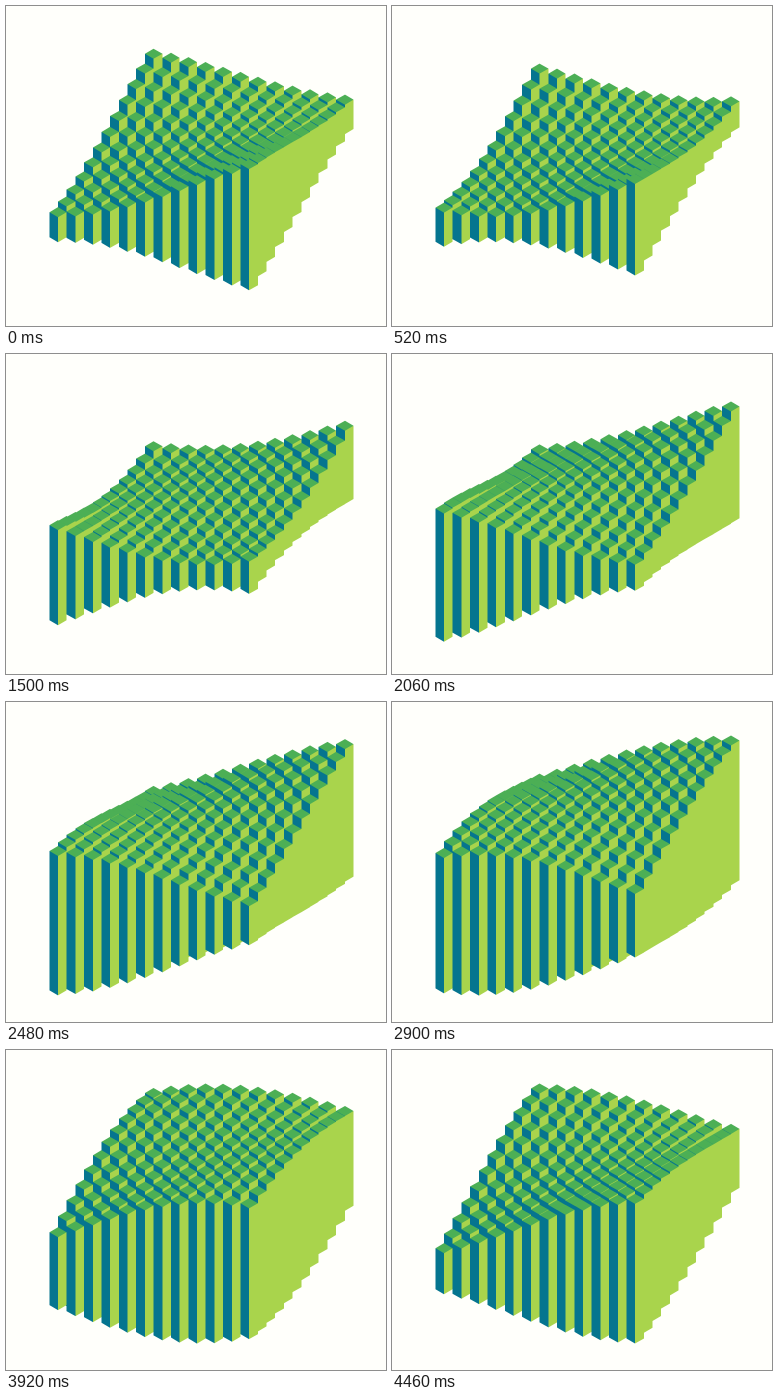
An HTML page with a canvas for the animation above (4.48 s loop, 380x320 px).

```html
<!DOCTYPE html>
<html>
<head>
<meta charset="utf-8">
<title>Column wave</title>
<style>
html, body { margin: 0; width: 100%; height: 100%; overflow: hidden; background: #fffffb; }
canvas { display: block; width: 380px; height: 320px; }
</style>
</head>
<body>
<canvas id="stage" width="760" height="640"></canvas>
<script>
const ctx = document.getElementById('stage').getContext('2d');
const RAD = Math.PI / 180;
const SCALE = 2;
const LOOP = 4480, BEAT = 140;
const HALF_W = 8.69, HALF_H = 5.02, ROW = 10.03;
const LEFT = 43.3, BASE = 218.7;
const MEAN = 41.2, AMP = 28.7;
const TEAL = '#05758f', LIME = '#a9d44c', GREEN = '#4caf55';

ctx.scale(SCALE, SCALE);

// Vertical edges on whole canvas pixels keep neighbouring faces seamless.
const edgeX = k => Math.round((LEFT + HALF_W * k) * SCALE) / SCALE;

function poly(color, ...pts) {
  ctx.fillStyle = color;
  ctx.beginPath();
  for (const [x, y] of pts) ctx.lineTo(x, y);
  ctx.fill();
}

function column(k, y, h) {
  const l = edgeX(k), m = edgeX(k + 1), r = edgeX(k + 2);
  const top = y - h, bottom = y + h;
  poly(TEAL, [l, top], [m, top], [m, bottom + HALF_H], [l, bottom]);
  poly(LIME, [m, top], [r, top], [r, bottom], [m, bottom + HALF_H]);
  poly(GREEN, [l, top], [m, top - HALF_H], [r, top], [m, top + HALF_H]);
}

// Each beat holds one pose for 100 ms, then two for 20 ms each.
function poseAt(t) {
  const rest = t % BEAT;
  return 3 * Math.floor(t / BEAT) + (rest < 100 ? 0 : rest < 120 ? 1 : 2);
}

function draw(t) {
  const turn = 107.5 + poseAt(t) * 10 / 3;
  ctx.fillStyle = '#fffffb';
  ctx.fillRect(0, 0, 380, 320);
  for (let j = 11; j >= 0; j--) {
    for (let i = 0; i < 12; i++) {
      const phase = turn + 2 * (i - 6) * (j - 6);
      column(2 * i + j, BASE - ROW * j, MEAN + AMP * Math.cos(phase * RAD));
    }
  }
}

function tick() {
  draw(performance.now() % LOOP);
  requestAnimationFrame(tick);
}
tick();
</script>
</body>
</html>
```
